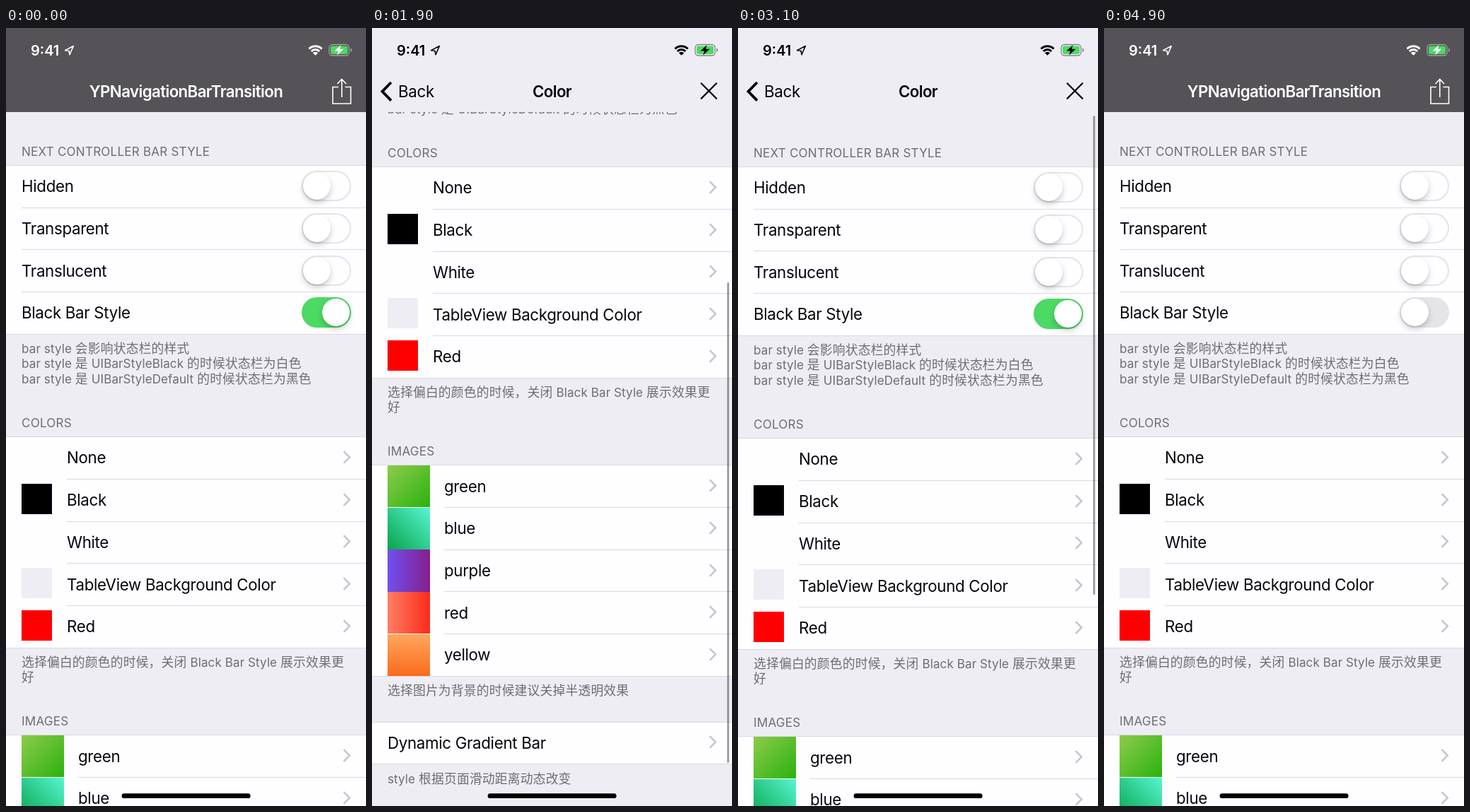
An HTML page that plays this animation: 509 px wide and 1101 px high, repeating every 5 s.

```html
<!DOCTYPE html>
<html lang="zh-CN">
<head>
<meta charset="utf-8">
<title>YPNavigationBarTransition</title>
<style>
  html, body { margin: 0; width: 100%; height: 100%; overflow: hidden; background: #efedf4; }
  #stage {
    position: absolute; left: 0; top: 0; width: 509px; height: 1101px; overflow: hidden;
    font: 22.3px/30px Inter, "Noto Sans CJK SC", "Noto Sans CJK", sans-serif;
    font-optical-sizing: none; letter-spacing: -.32px; color: #050507; white-space: nowrap;
  }
  #stage div, #stage svg { position: absolute; }
  .page { left: 0; top: 0; width: 509px; height: 1101px; background: #efedf4; overflow: hidden; }
  #next { overflow: visible; box-shadow: 0 0 13px rgba(0, 0, 0, .22); }
  .clip { inset: 0; overflow: hidden; }
  .list { left: 0; top: 0; width: 509px; height: 1500px; }
  .bar { left: 0; top: 0; width: 509px; height: 119.4px; }
  .group { left: 0; width: 509px; background: #fefdff; }
  .line { right: 0; height: 1px; background: #dad9de; }
  .small { font-size: 17.06px; letter-spacing: .1px; color: #6d6d72; }
  .small i { font-style: normal; font-size: 17.8px; letter-spacing: .18px; }
  .heading { letter-spacing: .22px; }
  .switch {
    left: 418px; width: 70px; height: 43px; box-sizing: border-box; border-radius: 22px;
    border: 2px solid #e5e4e7; background: #fefdff;
  }
  .thumb {
    left: 0; top: 0; width: 39px; height: 39px; border-radius: 50%; background: #fff;
    box-shadow: 0 4px 8px rgba(0, 0, 0, .2), 0 1px 1px rgba(0, 0, 0, .1);
  }
  .on { border-color: #4cd964; background: #4cd964; }
  .on .thumb { transform: translateX(27px); }
  #dim { inset: 0; background: #000; }
  #scroller { left: 502px; width: 3px; border-radius: 2px; background: rgba(0, 0, 0, .36); }
  .title { top: 75px; left: 0; width: 509px; text-align: center; font-weight: 600; letter-spacing: -.62px; }
  #back { left: 0; top: 75px; }
  #status { left: 0; top: 0; }
  #time { left: 35px; top: 16.5px; font-size: 20px; font-weight: 600; letter-spacing: 0; }
  svg { left: 0; top: 0; fill: none; overflow: visible; }
</style>
</head>
<body>
<div id="stage">
  <div class="page" id="root"></div>
  <div class="page" id="next"></div>

  <div class="title" id="rootTitle" style="color:#fff">YPNavigationBarTransition</div>
  <div class="title" id="nextTitle">Color</div>
  <div id="back">Back</div>
  <svg width="509" height="120">
    <path id="share" stroke="#fff" stroke-width="1.6" d="M470 83.5H462V107H487.500V83.500H479.500M474.800 98V73M468.500 79L474.800 72.500L481 79"/>
    <path id="chevron" stroke="currentColor" stroke-width="3.8" d="M27 77L14.500 89.800L27 102.600"/>
    <path id="close" stroke="#000" stroke-width="2.2" d="M465 77.800L487.600 100.400M487.600 77.800L465 100.400"/>
  </svg>

  <div id="status">
    <div id="time">9:41</div>
    <svg width="509" height="60">
      <path stroke="currentColor" stroke-width="1.6" stroke-linejoin="round" d="M95.300 25.500L83.500 31.600L89 32.300L90 37.800Z"/>
      <g stroke="currentColor" stroke-width="3">
        <path d="M428.500 29.500A12.700 12.700 0 0 1 446.500 29.500"/>
        <path d="M431.800 33A8 8 0 0 1 443.200 33"/>
      </g>
      <path fill="currentColor" d="M437.500 38.800L433.800 35.200A5.200 5.200 0 0 1 441.200 35.200Z"/>
      <rect x="457" y="23.500" width="28" height="15.500" rx="4.500" stroke="currentColor" stroke-opacity=".45" stroke-width="1.3"/>
      <path fill="currentColor" fill-opacity=".45" d="M487 28.500Q489 29 489 31.200T487 34Z"/>
      <rect x="459" y="25.500" width="24" height="11.500" rx="2.500" fill="#4cd964"/>
      <path fill="currentColor" d="M473.500 24L464.500 32.500H470L468 38.500L477.500 29.800H471.800Z"/>
    </svg>
  </div>
  <svg width="509" height="1101"><rect x="163.600" y="1083.300" width="182" height="6.800" rx="3.400" fill="#000"/></svg>
</div>

<script>
const LOOP = 5000, STEP = 100, WIDTH = 509, ROW = 59.7;
const $ = id => document.getElementById(id);

const label = (x, y, text, cls = '') =>
  `<div class="${cls}" style="left:${x}px;top:${y - 15}px">${text}</div>`;
const heading = (y, text) => label(22, y, text, 'small heading');
const note = (y, text) =>
  label(22, y, text.replace(/[\u3000-\uffef]+/g, '<i>$&</i>'), 'small');
const line = (x, y) => `<div class="line" style="left:${x}px;top:${y}px"></div>`;
const box = (y, width, height, fill) =>
  `<div style="left:22px;top:${y}px;width:${width}px;height:${height}px;background:${fill}"></div>`;
const arrow = y =>
  `<svg width="12" height="20" style="left:476px;top:${y - 10}px"><path d="M1.500 1.200L9.800 9.500L1.500 17.800" stroke="#c7c6cb" stroke-width="2.500"/></svg>`;
const toggle = (y, on) =>
  `<div class="switch ${on ? 'on' : ''}" style="top:${y - 22}px"><div class="thumb"></div></div>`;

// A white block of rows with hairlines; inset is where the inner lines start.
function group(top, inset, rows, draw) {
  const height = rows.length * ROW;
  let html = `<div class="group" style="top:${top}px;height:${height}px"></div>`;
  rows.forEach((row, i) => {
    const y = top + i * ROW;
    html += line(i ? inset : 0, Math.round(y - .5)) + draw(row, y, y + ROW / 2);
  });
  return html + line(0, Math.round(top + height - .5));
}

const switches = ['Hidden', 'Transparent', 'Translucent', 'Black Bar Style'];
const colors = [
  ['None', 'none'], ['Black', '#000'], ['White', 'none'],
  ['TableView Background Color', '#efedf4'], ['Red', '#f00']
];
const images = [
  ['green', '135deg, #8ecb4c, #2ab20e'], ['blue', '45deg, #08a34c, #56f6d0'],
  ['purple', '90deg, #7050f0, #841e8c'], ['red', '90deg, #ff7f64, #fb2a1a'],
  ['yellow', '180deg, #ffa75e, #fa6a1c']
];

const list = '<div class="list">' +
  heading(174.5, 'NEXT CONTROLLER BAR STYLE') +
  group(194.3, 22, switches, (name, y, mid) =>
    label(22, mid, name) + toggle(mid, name === 'Black Bar Style')) +
  note(453.5, 'bar style 会影响状态栏的样式') +
  note(475.2, 'bar style 是 UIBarStyleBlack 的时候状态栏为白色') +
  note(497, 'bar style 是 UIBarStyleDefault 的时候状态栏为黑色') +
  heading(558.5, 'COLORS') +
  group(578.6, 86, colors, ([name, fill], y, mid) =>
    box(y + 6.4, 43.4, 43.4, fill) + label(86, mid, name) + arrow(mid - .5)) +
  note(897.5, '选择偏白的颜色的时候，关闭 Black Bar Style 展示效果更') +
  note(919.2, '好') +
  heading(980.5, 'IMAGES') +
  group(1000.8, 102, images, ([name, stops], y, mid) =>
    box(y, 60, 59.5, `linear-gradient(${stops})`) + label(102, mid, name) + arrow(mid - .5)) +
  note(1320.3, '选择图片为背景的时候建议关掉半透明效果') +
  group(1364, 22, ['Dynamic Gradient Bar'], (name, y, mid) =>
    label(22, mid, name) + arrow(mid - .5)) +
  note(1444.5, 'style 根据页面滑动距离动态改变') + '</div>';

$('root').innerHTML = list + '<div class="bar" style="background:#555357"></div><div id="dim"></div>';
$('next').innerHTML = `<div class="clip">${list}<div class="bar" style="background:#efedf4"></div><div id="scroller"></div></div>`;

const nextList = $('next').querySelector('.list');
const styleSwitch = $('root').querySelector('.on');
const styleThumb = styleSwitch.firstChild;

// Piecewise linear tables of [ms, value].
const scrollTrack = [
  [1400, 0], [1500, 30], [1600, 130], [1700, 240], [1800, 330], [1900, 382], [2000, 404],
  [2100, 411], [2200, 411], [2300, 380], [2400, 265], [2500, 125], [2600, 10],
  [2700, -31.7], [2800, -28], [2900, -14], [3000, -6], [3100, -2], [3200, 0]
];
const swipeTrack = [
  [3900, 0], [4000, 10], [4100, 38], [4200, 82], [4300, 136],
  [4400, 330], [4500, 465], [4600, 503], [4700, WIDTH]
];

function at(track, t) {
  const i = track.findIndex(key => key[0] > t);
  if (i === 0) return track[0][1];
  if (i < 0) return track[track.length - 1][1];
  const [t0, a] = track[i - 1], [t1, b] = track[i];
  return a + (b - a) * (t - t0) / (t1 - t0);
}
const ramp = (t, from, to) => Math.min(1, Math.max(0, (t - from) / (to - from)));
const mix = (a, b, k) => `rgb(${a.map((v, i) => Math.round(v + (b[i] - v) * k))})`;

// How far the pushed page sits off to the right, 0 to 1.
function offset(t) {
  if (t > 3000) return at(swipeTrack, t) / WIDTH;
  const s = Math.max(0, t - 780) * .0175;
  const q = (1 + s) * Math.exp(-s);
  return q < .001 ? 0 : q;
}

function render(t) {
  const q = offset(t);
  const fade = k => Math.max(0, 1 - k * q * q);
  const popping = t >= 3900;

  $('root').style.transform = `translateX(${-.3 * WIDTH * (1 - q)}px)`;
  $('dim').style.opacity = .1 * (1 - q);
  $('next').style.transform = `translateX(${Math.round(q * WIDTH)}px)`;
  $('next').style.visibility = q < 1 ? 'visible' : 'hidden';

  const scroll = at(scrollTrack, t);
  nextList.style.transform = `translateY(${-scroll}px)`;
  const scroller = $('scroller').style;
  scroller.top = 124 + .618 * Math.max(0, scroll) + 'px';
  scroller.height = 680 + Math.min(0, scroll) + 'px';
  scroller.opacity = ramp(t, 1350, 1450) * (1 - ramp(t, 3850, 4100));

  $('rootTitle').style.transform = `translateX(${-81 * (1 - q)}px)`;
  $('rootTitle').style.opacity = $('share').style.opacity = q * q;
  $('nextTitle').style.transform = `translateX(${485 * q ** 1.47}px)`;
  $('nextTitle').style.opacity = fade(10.5);
  $('back').style.transform = `translateX(${37 + 78 * q}px)`;
  $('back').style.opacity = fade(9);
  $('chevron').style.opacity = fade(7);
  $('close').style.opacity = fade(8.7);
  $('back').style.color = $('chevron').style.color = popping ? '#fff' : '#000';
  if (popping && q === 0) $('back').style.color = $('chevron').style.color = '#000';

  const dark = ramp(t, 780, 980) * (1 - ramp(t, 3900, 4100));
  $('status').style.color = mix([255, 255, 255], [0, 0, 0], dark);

  const off = ramp(t, 4700, 4790);
  styleSwitch.style.background = styleSwitch.style.borderColor =
    mix([76, 217, 100], [229, 228, 231], off);
  styleThumb.style.transform = `translateX(${27 * (1 - ramp(t, 4720, 4860))}px)`;
}

const start = performance.now();
function tick() {
  const t = (performance.now() - start + 2) % LOOP;
  render(Math.floor(t / STEP) * STEP);
  requestAnimationFrame(tick);
}
tick();
</script>
</body>
</html>
```
